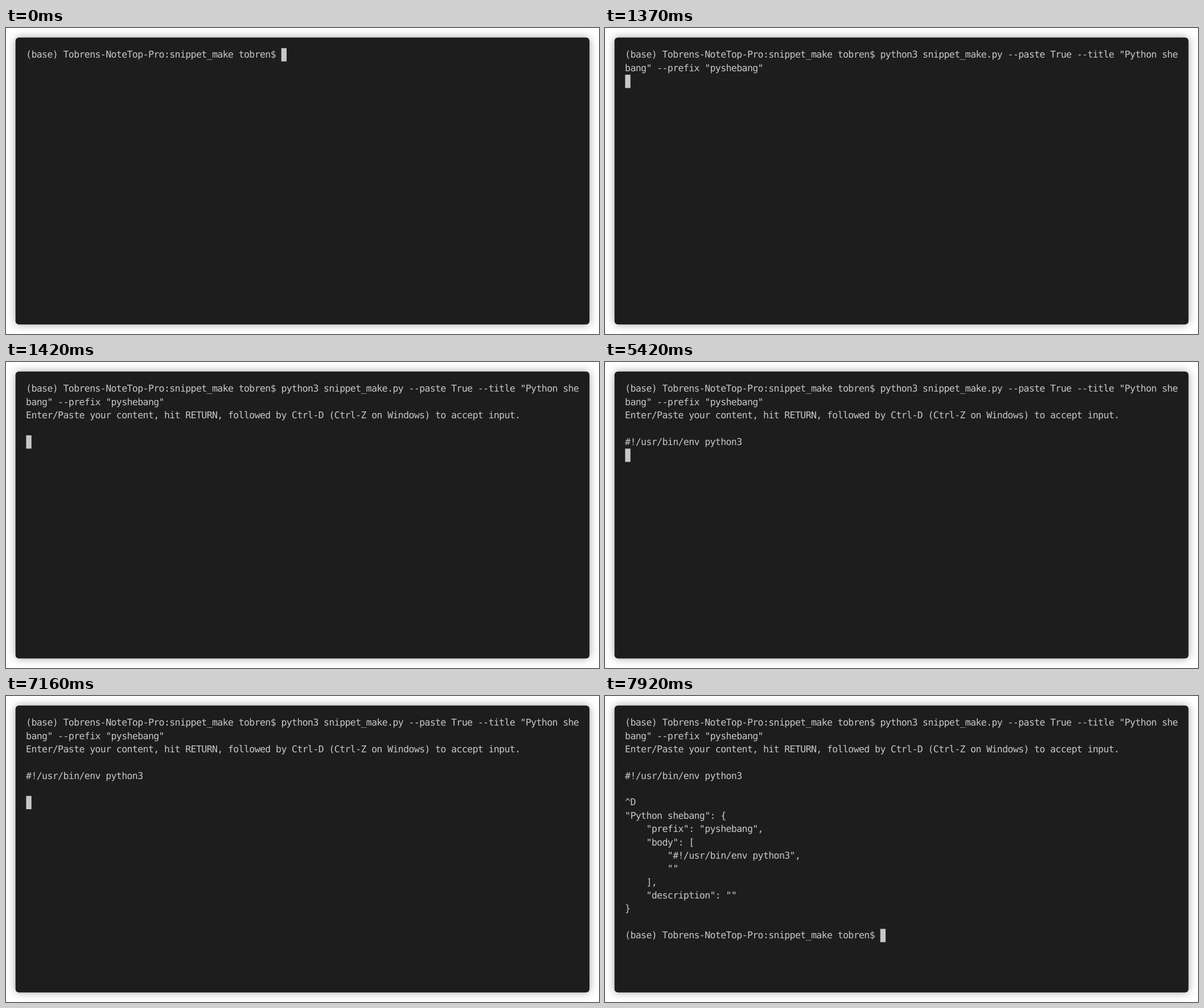
Recreate the animation shown at these times as an HTML page with a canvas. Size 1042x538 px, loop 8 s.

```html
<!DOCTYPE html>
<html lang="en">
<head>
<meta charset="utf-8">
<title>Terminal session</title>
<style>
  html, body { margin: 0; width: 100%; height: 100%; overflow: hidden; background: #fff; }
  canvas { display: block; }
</style>
</head>
<body>
<canvas id="stage" width="1042" height="538"></canvas>
<script>
const ctx = document.getElementById('stage').getContext('2d');
const LOOP = 8000;
const CELL = { w: 9.34, h: 23.375 };
const ORIGIN = { x: 35.4, y: 35.4 };
const BASELINE = 16.8;
const COLORS = { page: '#fff', window: '#1d1d1d', text: '#c7c7c7', cursor: '#c7c7c7' };

const prompt = '(base) Tobrens-NoteTop-Pro:snippet_make tobren$ ';
const command = [
  prompt + 'python3 snippet_make.py --paste True --title "Python she',
  'bang" --prefix "pyshebang"'
];
const hint = [
  ...command,
  'Enter/Paste your content, hit RETURN, followed by Ctrl-D (Ctrl-Z on Windows) to accept input.',
  ''
];
const pasted = [...hint, '#!/usr/bin/env python3'];
const ended = [...pasted, '', '^D'];
const result = [
  ...ended,
  '"Python shebang": {',
  '    "prefix": "pyshebang",',
  '    "body": [',
  '        "#!/usr/bin/env python3",',
  '        ""',
  '    ],',
  '    "description": ""',
  '}',
  '',
  prompt
];

// Cursor is [column, row].
const states = [
  { at: 0, lines: [prompt], cursor: [prompt.length, 0] },
  { at: 840, lines: command, cursor: [command[1].length, 1] },
  { at: 1370, lines: command, cursor: [0, 2] },
  { at: 1420, lines: hint, cursor: [0, 4] },
  { at: 3420, lines: pasted, cursor: [pasted[4].length, 4] },
  { at: 5420, lines: pasted, cursor: [0, 5] },
  { at: 7160, lines: pasted, cursor: [0, 6] },
  { at: 7820, lines: ended, cursor: [0, 6] },
  { at: 7920, lines: result, cursor: [prompt.length, 16] }
];

function drawWindow() {
  ctx.fillStyle = COLORS.page;
  ctx.fillRect(0, 0, 1042, 538);
  ctx.save();
  ctx.shadowColor = 'rgba(0, 0, 0, 0.35)';
  ctx.shadowBlur = 15;
  ctx.fillStyle = COLORS.window;
  ctx.beginPath();
  ctx.roundRect(16.7, 16.7, 1008.6, 504.6, 6);
  ctx.fill();
  ctx.restore();
}

// Glyphs are slightly larger than the cell pitch, so each is centred in its cell.
function drawChar(char, col, row, color) {
  ctx.fillStyle = color;
  ctx.fillText(char, ORIGIN.x + (col + 0.5) * CELL.w, ORIGIN.y + row * CELL.h + BASELINE);
}

function drawCursor([col, row], lines) {
  ctx.fillStyle = COLORS.cursor;
  ctx.fillRect(ORIGIN.x + col * CELL.w, ORIGIN.y + row * CELL.h, CELL.w, CELL.h);
  const under = lines[row]?.[col];
  if (under) drawChar(under, col, row, COLORS.window);
}

function draw({ lines, cursor }) {
  drawWindow();
  ctx.font = '16.6px "DejaVu Sans Mono", monospace';
  ctx.textAlign = 'center';
  ctx.textRendering = 'geometricPrecision';
  lines.forEach((line, row) => {
    [...line].forEach((char, col) => drawChar(char, col, row, COLORS.text));
  });
  drawCursor(cursor, lines);
}

function tick() {
  const time = performance.now() % LOOP;
  draw(states.findLast(state => state.at <= time));
  requestAnimationFrame(tick);
}
tick();
</script>
</body>
</html>
```
